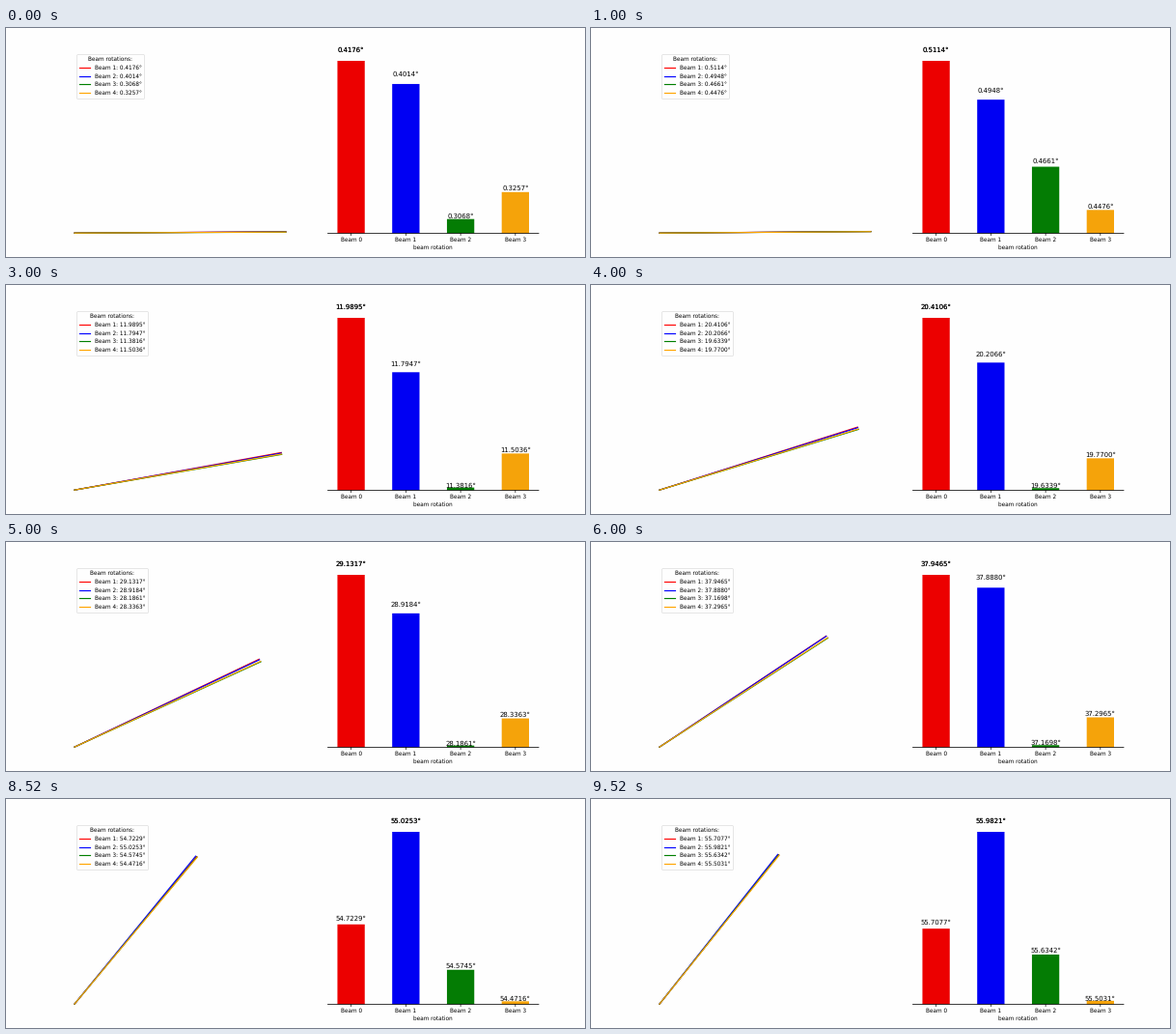
A matplotlib script that plays this animation: 600x237 px, repeating every 10 s.

```python
import numpy as np
import matplotlib.pyplot as plt
from matplotlib.animation import FuncAnimation
from matplotlib.patches import Rectangle

WIDTH, HEIGHT, DPI = 600, 237, 100
FRAMES, LOOP_MS = 20, 10000
PT = 72 / DPI                      # points per pixel
SMALL, LARGE = 5.79 * PT, 6.94 * PT

LINE_COLORS = ["red", "blue", "green", "orange"]
BAR_COLORS = ["#ec0000", "#0000f3", "#047c04", "#f5a30a"]

# Beam angles in degrees at key steps, with the common angular speed there.
STEPS = np.array([0, 2, 6, 10, 14, 17, 19])
SPEEDS = np.array([0, 0.1, 4.1, 4.4, 4.1, 1.1, 0.1])
ANGLES = np.array([
    [0.4176, 0.4014, 0.3068, 0.3257],
    [0.5114, 0.4948, 0.4661, 0.4476],
    [11.9895, 11.7947, 11.3816, 11.5036],
    [29.1317, 28.9184, 28.1861, 28.3363],
    [46.4613, 46.5576, 45.8535, 45.9567],
    [54.7229, 55.0253, 54.5745, 54.4716],
    [55.7077, 55.9821, 55.6342, 55.5031],
])

ORIGIN_X, ORIGIN_Y = 71.0, 212.2
BEAM_LENGTH, Y_SCALE = 219.0, 0.853

BASE_Y, MAX_BAR = 212.5, 178.5
BAR_X, BAR_STEP, BAR_WIDTH = 357.6, 56.75, 28.3
MARGIN = 0.01                      # gap below the smallest value, in degrees


def angles_at(step):
    """Cubic Hermite interpolation of the four beam angles."""
    k = min(np.searchsorted(STEPS, step, side="right") - 1, len(STEPS) - 2)
    span = STEPS[k + 1] - STEPS[k]
    t = (step - STEPS[k]) / span
    blend = t * t * (3 - 2 * t)
    bend = span * (SPEEDS[k] * t * (1 - t) ** 2 - SPEEDS[k + 1] * t * t * (1 - t))
    return ANGLES[k] + (ANGLES[k + 1] - ANGLES[k]) * blend + bend


plt.rcParams.update({
    "font.family": "DejaVu Sans",
    "text.hinting": "none",
    "toolbar": "None",
    "patch.linewidth": 0.58 * PT,
})
fig = plt.figure(figsize=(WIDTH / DPI, HEIGHT / DPI), dpi=DPI, facecolor="#fefefe")
ax = fig.add_axes([0, 0, 1, 1])
ax.set_xlim(0, WIDTH)
ax.set_ylim(HEIGHT, 0)
ax.axis("off")


def stroke(xs, ys, width, color="black", **kwargs):
    return ax.plot(xs, ys, color=color, lw=width * PT, snap=False, **kwargs)[0]


def label(x, y, text="", size=SMALL):
    return ax.text(x, y, text, fontsize=size, ha="center", va="baseline", zorder=5)


beams = [stroke([], [], 1.15, color, solid_capstyle="projecting", label="Beam")
         for color in LINE_COLORS]
legend = ax.legend(handles=beams, title="Beam rotations:", loc="upper left",
                   bbox_to_anchor=(73.3, 27.4), bbox_transform=ax.transData,
                   borderaxespad=0, fontsize=SMALL, title_fontsize=SMALL)

bars, values = [], []
for i, color in enumerate(BAR_COLORS):
    x = BAR_X + i * BAR_STEP
    bar = Rectangle((x - BAR_WIDTH / 2, BASE_Y), BAR_WIDTH, 0,
                    facecolor=color, lw=0, snap=False, zorder=2)
    bars.append(ax.add_patch(bar))
    values.append(label(x, BASE_Y, size=LARGE))
    stroke([x, x], [BASE_Y, BASE_Y + 2.1], 0.7, zorder=4)
    label(x, 221.2, f"Beam {i}")

stroke([333.5, 552], [BASE_Y, BASE_Y], 0.75, zorder=4)
label(442.7, 229.2, "beam rotation")
top_value = label(0, 0, size=LARGE)   # the largest value is printed twice


def update(step):
    angles = angles_at(step)
    low, high = angles.min() - MARGIN, angles.max()
    heights = MAX_BAR * (angles - low) / (high - low)
    for i, angle in enumerate(angles):
        rad = np.radians(angle)
        beams[i].set_data([ORIGIN_X, ORIGIN_X + BEAM_LENGTH * np.cos(rad)],
                          [ORIGIN_Y, ORIGIN_Y - BEAM_LENGTH * Y_SCALE * np.sin(rad)])
        legend.get_texts()[i].set_text(f"Beam {i + 1}: {angle:.4f}°")
        bars[i].set_height(-heights[i])
        values[i].set_text(f"{angle:.4f}°")
        values[i].set_y(BASE_Y - 1.05 * heights[i])
    top = values[int(np.argmax(angles))]
    top_value.set_text(top.get_text())
    top_value.set_position(top.get_position())
    return []


anim = FuncAnimation(fig, update, frames=FRAMES, interval=LOOP_MS / FRAMES,
                     repeat=True, repeat_delay=0, blit=False)
plt.show()
```
